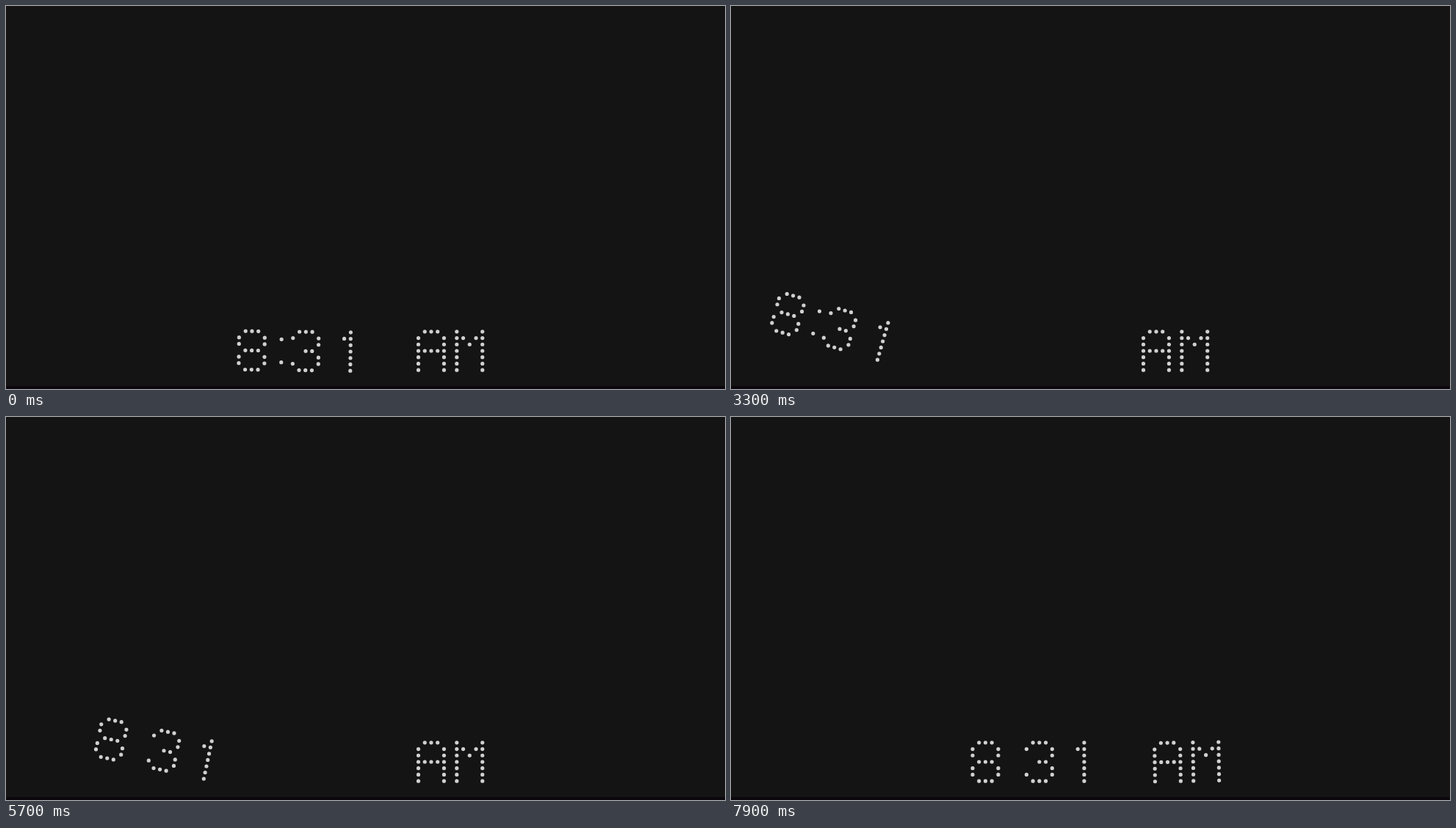
Write an HTML page with a canvas that moves like this. It is 979 by 522 pixels and loops after 8 s.

```html
<!DOCTYPE html>
<html lang="en">
<head>
<meta charset="utf-8">
<title>Swinging clock</title>
<style>
html, body { margin: 0; width: 100%; height: 100%; overflow: hidden; background: #141414; }
canvas { display: block; }
</style>
</head>
<body>
<canvas id="stage" width="979" height="522"></canvas>
<script>
const ctx = document.getElementById('stage').getContext('2d');
const LOOP = 8000, STEP = 100;
const PITCH = 8.73, TOP = 443.8, RADIUS = 2.6;
const PIVOT_Y = -513;
const SWING = 16.35, SPEED = 22.88, PHASE = 2.42; // degrees, degrees per second
const COLON_OFF = 5700;
const RAD = Math.PI / 180;

const GLYPHS = {
  8: ' ### /#   #/#   #/ ### /#   #/#   #/ ### ',
  3: ' ### /#   #/    #/  ## /    #/#   #/ ### ',
  1: ' #/##/ #/ #/ #/ #/ #',
  A: ' ### /#   #/#   #/#####/#   #/#   #/#   #',
  M: '#   #/## ##/# # #/#   #/#   #/#   #/#   #'
};

function glyph(char, x) {
  const dots = [];
  GLYPHS[char].split('/').forEach((row, r) =>
    [...row].forEach((cell, c) => {
      if (cell === '#') dots.push([x + c * PITCH, TOP + r * PITCH]);
    }));
  return dots;
}

const digits = [...glyph('8', 329), ...glyph('3', 402.4), ...glyph('1', 472.2)];
const colon = [[386.8, 454.4], [386.8, 485.8]];
const suffix = [...glyph('A', 561.5), ...glyph('M', 613.8)];

function drawDots(dots, pivotX, degrees) {
  const cos = Math.cos(degrees * RAD), sin = Math.sin(degrees * RAD);
  ctx.beginPath();
  for (const [x, y] of dots) {
    const dx = x - pivotX, dy = y - PIVOT_Y;
    const px = pivotX + dx * cos - dy * sin;
    const py = PIVOT_Y + dx * sin + dy * cos;
    ctx.moveTo(px + RADIUS, py);
    ctx.arc(px, py, RADIUS, 0, 2 * Math.PI);
  }
  ctx.fill();
}

function draw(time) {
  const angle = SWING * Math.sin((PHASE + SPEED * time / 1000) * RAD);
  ctx.fillStyle = '#141414';
  ctx.fillRect(0, 0, 979, 522);
  ctx.fillStyle = '#0c070c';
  ctx.fillRect(0, 518, 979, 4);
  ctx.fillStyle = '#d0d0d0';
  // The digits swing left; on impact the suffix takes over the motion.
  const time831 = time < COLON_OFF ? [...digits, ...colon] : digits;
  drawDots(time831, 390, Math.max(angle, 0));
  drawDots(suffix, 605, Math.min(angle, 0));
}

const start = performance.now();
function frame() {
  const time = (performance.now() - start) % LOOP;
  draw(Math.floor(time / STEP) * STEP);
  requestAnimationFrame(frame);
}
frame();
</script>
</body>
</html>
```
